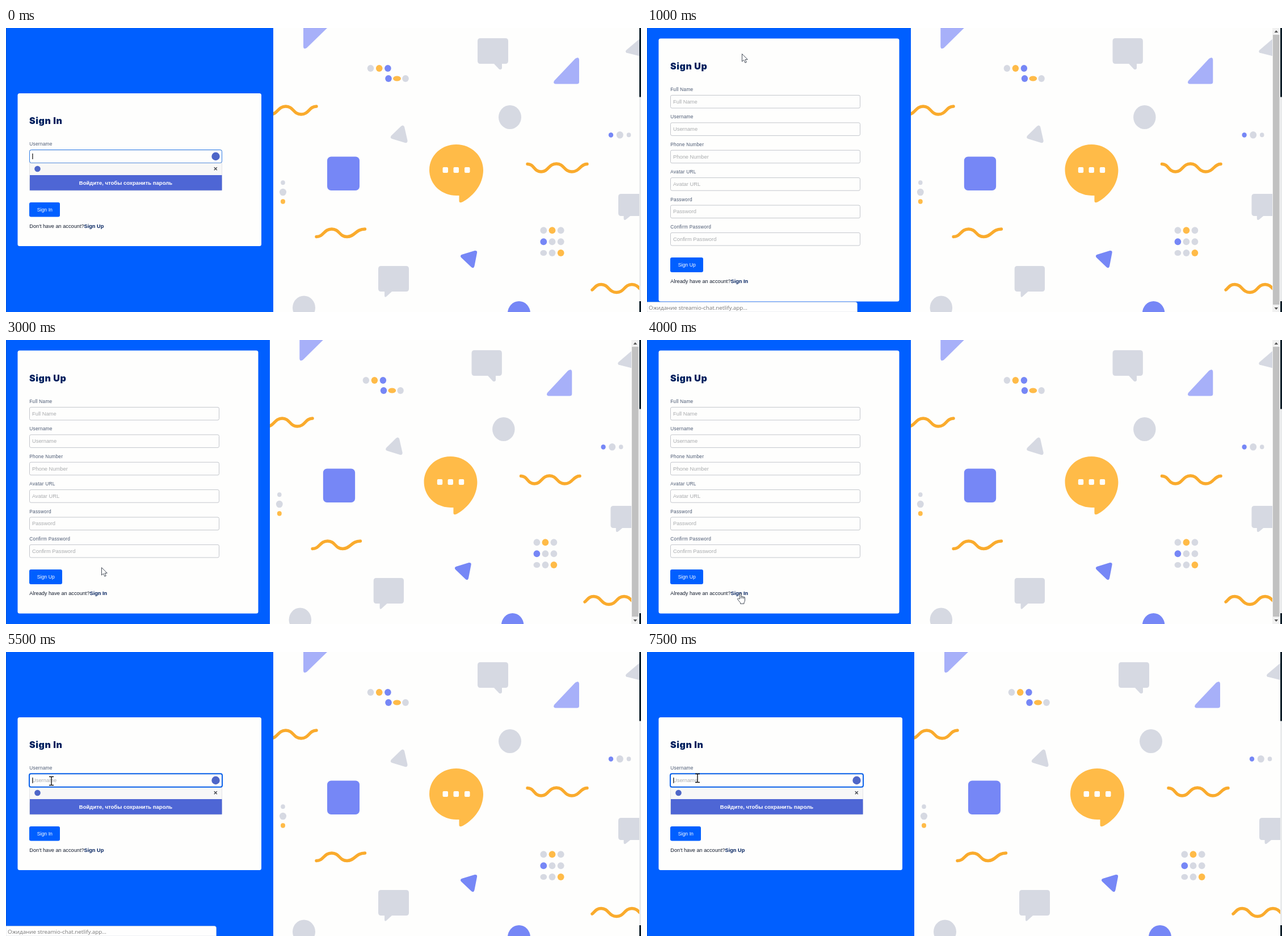
An HTML page for the animation above (8000 ms loop, 1119 px wide and 500 px high).

```html
<!DOCTYPE html>
<html lang="en">
<head>
<meta charset="utf-8">
<title>Sign in and sign up</title>
<style>
  html, body { margin: 0; width: 100%; height: 100%; overflow: hidden; background: #fefefd; }
  svg { display: block; width: 1119px; height: 500px; font-family: Arial, "Liberation Sans", sans-serif; }

  .grey { fill: #d6d9e2; }
  .gold { fill: #ffbb48; }
  .violet { fill: #7687f6; }
  .lilac { fill: #a7b0f9; }
  .paper { fill: #fefefd; }
  .blue { fill: #005fff; }
  .wave { fill: none; stroke: #faab2d; stroke-width: 5.4; stroke-linecap: round; stroke-linejoin: round; }

  .title { font: 900 16px Inter, "Arial Black", sans-serif; letter-spacing: .6px; fill: #00205e; }
  .label { font-size: 8.3px; letter-spacing: .26px; fill: #4a5872; }
  .hint { font-size: 9.35px; fill: #a9abae; }
  .box { fill: #fefefd; stroke: #c3c6cc; }
  .button { font-size: 8.75px; fill: #fff; }
  .note { font-size: 9.2px; fill: #111a2c; }
  .note tspan { font-weight: bold; fill: #00205e; }
  .offer { font-size: 9.5px; font-weight: bold; fill: #fff; text-anchor: middle; }
  .wait { font: 9.8px "Open Sans", "Noto Sans", sans-serif; fill: #777; }

  .timed { animation: 8s step-end infinite; }
  #signup { animation-name: signup; }
  #signin { animation-name: signin; }
  #popup { animation-name: popup; }
  #thin { animation-name: thin; }
  #thick { animation-name: thick; }
  #hint { animation-name: hint; }
  #caret { animation-name: caret; }
  #status { animation-name: status; }
  #arrow { animation-name: arrow; }
  #beam { animation-name: beam; }
  #hand { animation-name: hand; }

  /* one step of 500 ms is 6.25% */
  @keyframes signup { 0%, 56.25%, 100% { opacity: 0 } 12.5% { opacity: 1 } }
  @keyframes signin { 0%, 56.25%, 100% { opacity: 1 } 12.5% { opacity: 0 } }
  @keyframes popup { 0%, 62.5%, 100% { opacity: 1 } 12.5% { opacity: 0 } }
  @keyframes thin { 0% { opacity: 1 } 6.25%, 100% { opacity: 0 } }
  @keyframes thick { 0%, 12.5% { opacity: 0 } 6.25%, 68.75%, 100% { opacity: 1 } }
  @keyframes hint { 0% { opacity: 0 } 6.25%, 100% { opacity: 1 } }
  @keyframes caret {
    0%, 68.75%, 81.25%, 93.75%, 100% { opacity: 1 }
    12.5%, 75%, 87.5% { opacity: 0 }
  }
  @keyframes status {
    0%, 25%, 75%, 100% { opacity: 0 }
    6.25%, 68.75% { opacity: 1 }
    18.75% { opacity: .5 }
  }
  @keyframes arrow {
    0% { opacity: 0; transform: translate(167px, 45px) }
    6.25% { opacity: 1; transform: translate(167px, 45px) }
    25% { opacity: 1; transform: translate(168px, 45px) }
    31.25% { opacity: 0; transform: translate(168px, 45px) }
    37.5% { opacity: 1; transform: translate(168px, 400px) }
    43.75% { opacity: 0; transform: translate(168px, 400px) }
    56.25% { opacity: 1; transform: translate(134px, 349px) }
    62.5%, 100% { opacity: 0; transform: translate(134px, 349px) }
  }
  @keyframes beam {
    0% { opacity: 0; transform: translate(172px, 231px) }
    31.25% { opacity: 1; transform: translate(172px, 231px) }
    37.5% { opacity: 0; transform: translate(172px, 231px) }
    62.5% { opacity: 1; transform: translate(80px, 225px) }
    68.75% { opacity: 1; transform: translate(80px, 227px) }
    75% { opacity: 1; transform: translate(86px, 223px) }
    81.25%, 100% { opacity: 1; transform: translate(89px, 222px) }
  }
  @keyframes hand {
    0% { opacity: 0; transform: translate(169px, 443px) }
    43.75% { opacity: 1; transform: translate(169px, 443px) }
    50% { opacity: 1; transform: translate(159px, 445px) }
    56.25%, 100% { opacity: 0; transform: translate(159px, 445px) }
  }
</style>
</head>
<body>
<svg viewBox="0 0 1119 500">
  <defs>
    <g id="art">
      <rect class="paper" x="471" width="648" height="500"/>
      <path class="lilac" d="M524 0V33Q524.500 38.500 530 35L566 0Z"/>
      <path class="lilac" d="M966 93L1003 54Q1009.500 49.500 1010 56V95Q1010 98.500 1006 98.500H968Q963.500 97.500 966 93Z"/>
      <path class="grey" d="M1119 17L1093 39Q1090 42.500 1095 44L1119 50Z"/>
      <path class="grey" d="M679 189.500L696 173Q700 169.500 702 174L707.500 198Q708 203 703 202L680 195Q676 193 679 189.500Z"/>
      <path class="violet" d="M803 399L826 392Q831 391.500 830 396L825.500 419Q824 424.500 820 421L802 404Q799.500 401 803 399Z"/>
      <path class="grey" d="M836 18H880Q885 18 885 23V58Q885 63 880 63H874V71Q873 74 869 72.500L860 63H836Q831 63 831 58V23Q831 18 836 18Z"/>
      <path class="grey" d="M661 419H705Q710 419 710 424V459Q710 464 705 464H680L670 473Q667 475 667 471V464H661Q656 464 656 459V424Q656 419 661 419Z"/>
      <path class="grey" d="M1084 292H1119V331H1100L1092 337.500Q1088.500 339 1088.500 335V331H1084Q1079 331 1079 326V297Q1079 292 1084 292Z"/>
      <rect class="violet" x="566" y="226.500" width="57" height="59.500" rx="7"/>
      <ellipse class="grey" cx="888" cy="157" rx="20" ry="21"/>
      <ellipse class="grey" cx="525" cy="492.500" rx="20" ry="21"/>
      <ellipse class="violet" cx="904" cy="502" rx="20" ry="21"/>
      <path class="gold" d="M793.500 205C820 205 841 225 841 250C841 277 822 297 804 306.500Q798.500 309 798.500 304V295H793.500C767 295 746 275 746 250C746 225 767 205 793.500 205Z"/>
      <g class="paper">
        <rect x="769.500" y="245" width="9.500" height="10" rx="2"/>
        <rect x="788.500" y="245" width="9.500" height="10" rx="2"/>
        <rect x="808" y="245" width="9.500" height="10" rx="2"/>
      </g>
      <g class="wave">
        <path d="M466 152c13 0 13 -14 27 -14s13 14 27 14s14 -14 27 -14"/>
        <path d="M919 239.500c12 0 11 13.500 24 13.500s13 -14 27 -14s13 14 27 14s15 -13.500 27 -13.500"/>
        <path d="M547 367.500c13 0 13 -13.500 27 -13.500s13 13.500 27 13.500s15 -13.500 31.500 -13.500"/>
        <path d="M1033 461c5 -4 7 -9.500 16 -9.500c13 0 13 14 27 14s13 -14 27 -14s13 14 27 14"/>
      </g>
      <g id="dots"></g>
    </g>
  </defs>

  <g id="signin" class="timed">
    <use href="#art"/>
    <rect class="blue" width="471" height="500"/>
    <rect class="paper" x="20.500" y="115" width="429.500" height="269" rx="3.500"/>
    <text class="title" x="41" y="169">Sign In</text>
    <g id="signinFields"></g>
    <rect class="blue" x="41" y="307" width="54" height="25.500" rx="3"/>
    <text class="button" x="54.700" y="323.300">Sign In</text>
    <text class="note" x="41.300" y="352.300">Don't have an account?<tspan>Sign Up</tspan></text>

    <rect id="thin" class="timed" x="41.500" y="214.500" width="339" height="23" rx="3" fill="none" stroke="#2f7de8"/>
    <g id="popup" class="timed">
      <rect x="41.500" y="238" width="339" height="48" fill="#f7f7f7" stroke="#d5d7dc" stroke-width=".6"/>
      <rect x="42" y="259" width="338.500" height="26.800" fill="#4e66d5"/>
      <text class="offer" x="211" y="275.600">Войдите, чтобы сохранить пароль</text>
      <g fill="#4e66c8">
        <circle cx="369.500" cy="226" r="7.200"/>
        <circle cx="55.500" cy="248" r="5.300"/>
      </g>
      <path d="M366.800 245.300l5 5m0 -5l-5 5" stroke="#4a4d55" stroke-width="1.500"/>
    </g>
    <rect id="thick" class="timed" x="41" y="214.200" width="340" height="23.600" rx="3" fill="none" stroke="#0a62ea" stroke-width="2"/>
    <rect id="caret" class="timed" x="46.300" y="221" width="1.200" height="10" fill="#111"/>
  </g>

  <g id="signup" class="timed">
    <use href="#art" transform="matrix(.9876 0 0 1 -.16 0)"/>
    <rect class="blue" width="465" height="500"/>
    <rect class="paper" x="20.500" y="18.500" width="424" height="463" rx="3.500"/>
    <text class="title" x="41" y="72.500">Sign Up</text>
    <g id="signupFields"></g>
    <rect class="blue" x="41" y="404" width="58" height="26" rx="3"/>
    <text class="button" x="54.700" y="420.200">Sign Up</text>
    <text class="note" x="41.300" y="449.400">Already have an account?<tspan>Sign In</tspan></text>
    <rect x="1102" width="14" height="500" fill="#f1f1f1"/>
    <rect x="1103" y="12" width="11.500" height="475" fill="#c1c1c1"/>
    <path d="M1105.500 8l3.300 -4l3.300 4zM1105.500 492l3.300 4l3.300 -4z" fill="#555"/>
  </g>

  <rect width=".8" height="500" fill="#0050d4"/>
  <rect x="1116" width="3" height="500" fill="#e9ebec"/>
  <path d="M1116 0h3v121.500h-3zM1116 481h3v19h-3z" fill="#0d1f29"/>

  <g id="status" class="timed">
    <path d="M0 482.500H367Q370.500 482.500 370.500 486V500H0Z" fill="#fefefe" stroke="#cfd3da" stroke-width=".6"/>
    <text class="wait" x="3" y="496">Ожидание streamio-chat.netlify.app...</text>
  </g>

  <path id="arrow" class="timed" d="M.5 .6V14L3.700 11.200L5.900 16.200L8.200 15.200L6.100 10.400H10.200Z" fill="#fff" stroke="#333b48" stroke-width=".9"/>
  <path id="beam" class="timed" d="M-4 -7.500H-1Q0 -7.500 0 -6.500Q0 -7.500 1 -7.500H4M0 -7V7M-4 7.500H-1Q0 7.500 0 6.500Q0 7.500 1 7.500H4" fill="none" stroke="#111" stroke-width="1.400"/>
  <path id="hand" class="timed" d="M4.500 11V2Q4.500 .6 5.700 .6T7 2V6.500Q8.200 5.500 9.300 6.900Q10.700 6 11.500 7.500Q13.500 7 13.500 9V13Q13.500 15.500 12 17V19.300H5.500V17.500L1 12Q.3 10.500 1.300 10T3.300 10.500ZM7 6.500V10M9.300 7V10M11.500 7.500V10.500" fill="#fff" stroke="#333b48" stroke-width=".9"/>
</svg>

<script>
  const byId = id => document.getElementById(id);

  // dots: class, x, y, radii
  const dot = (c, x, y, rx, ry = rx) =>
    `<ellipse class="${c}" cx="${x}" cy="${y}" rx="${rx}" ry="${ry}"/>`;
  const grid = ['grey', 'gold', 'grey', 'violet', 'grey', 'grey', 'grey', 'grey', 'gold'];

  byId('dots').innerHTML = [
    ...['grey', 'gold', 'violet'].map((c, i) => dot(c, 642.5 + i * 15.2, 71, 5.8, 6)),
    dot('violet', 674, 89, 5.8, 6),
    dot('gold', 689, 89, 7, 4.5),
    dot('grey', 704, 89, 5.8, 6),
    dot('violet', 1066, 188.3, 4.2, 4.4),
    dot('grey', 1081.8, 188.3, 6, 6.3),
    dot('grey', 1097.5, 188.3, 3.8, 4),
    dot('grey', 488, 272.3, 3.8, 4),
    dot('grey', 488, 289, 6, 6.3),
    dot('gold', 488, 305.5, 4, 4.2),
    ...grid.map((c, i) =>
      dot(c, 947.3 + i % 3 * 15.2, 356.3 + (i / 3 | 0) * 19.9, 5.9, i === 6 ? 5 : 6))
  ].join('');

  // labelled inputs, stacked from the given label baseline
  const field = (name, y, w, attrs = '') => `
    <text class="label" x="41.3" y="${y}">${name}</text>
    <rect class="box" x="41.5" y="${y + 7.4}" width="${w}" height="22.6" rx="2.5"/>
    <text class="hint" ${attrs} x="46" y="${y + 21.8}">${name}</text>`;

  byId('signinFields').innerHTML =
    field('Username', 207.4, 339).replace('class="hint"', 'id="hint" class="hint timed"') +
    field('Password', 255.8, 339);

  byId('signupFields').innerHTML =
    ['Full Name', 'Username', 'Phone Number', 'Avatar URL', 'Password', 'Confirm Password']
      .map((name, i) => field(name, 111 + i * 48.4, 334)).join('');
</script>
</body>
</html>
```
